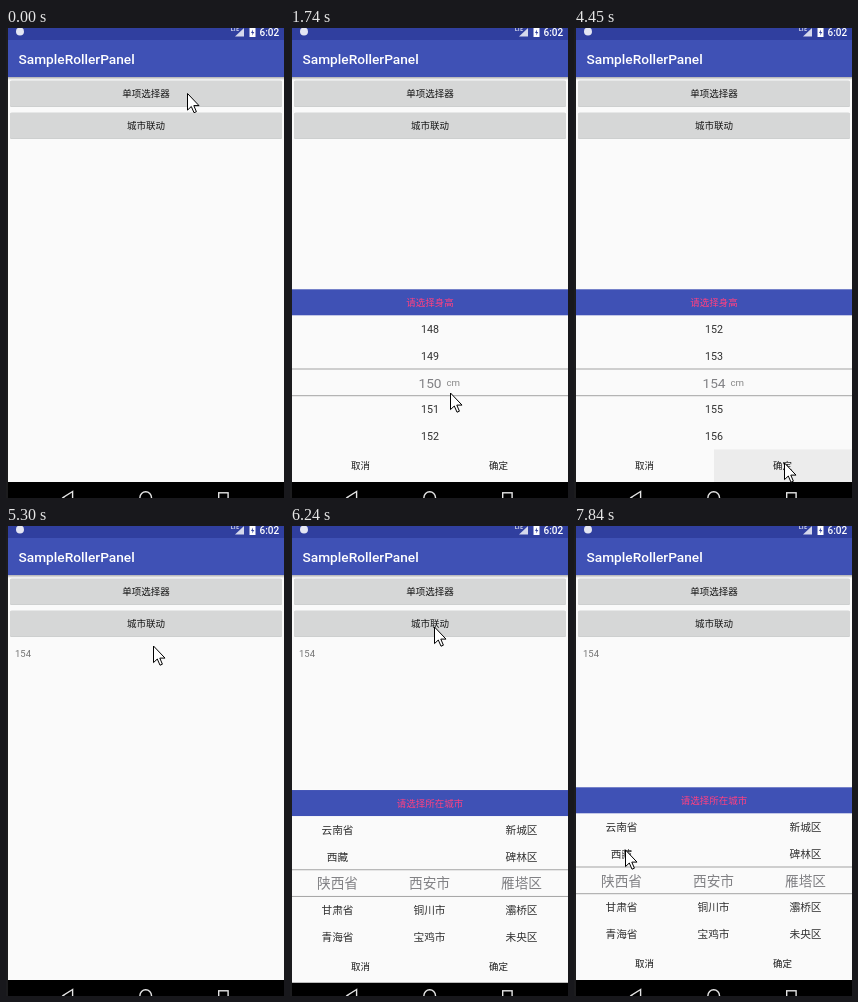
Recreate the animation shown at these times as an HTML page. Size 278 px wide and 470 px high, loop 7.99 s.

```html
<!DOCTYPE html>
<html lang="zh-CN">
<head>
<meta charset="utf-8">
<title>Picker demo</title>
<style>
html, body { margin: 0; width: 100%; height: 100%; overflow: hidden; background: #fafafa; }
svg { display: block; width: 278px; height: 470px; }
text { font-family: Roboto, "Noto Sans CJK SC", sans-serif; }
</style>
</head>
<body>
<svg viewBox="0 0 278 470">
  <defs>
    <linearGradient id="shade" x2="0" y2="1">
      <stop stop-color="#000" stop-opacity=".3"/>
      <stop offset="1" stop-color="#000" stop-opacity="0"/>
    </linearGradient>
    <clipPath id="wheelClip"><rect x="2" y="287" width="276" height="134"/></clipPath>
  </defs>

  <rect width="278" height="470" fill="#fafafa"/>
  <rect y="49" width="278" height="3" fill="url(#shade)"/>
  <rect width="278" height="49" fill="#3f51b5"/>
  <rect width="278" height="12" fill="#303f9f"/>
  <circle cx="14" cy="3.5" r="4" fill="#e4e6f3"/>
  <text x="225" y="3" font-size="5" font-weight="500" fill="#fff">LTE</text>
  <path d="M229 8.5H238V0Z" fill="#d5d8ec"/>
  <path d="M243.5 0H249.5V9H243.5Z" fill="#fff"/>
  <path d="M247 1.5L245 5H246.5L246 7.5L248.3 4H246.8Z" fill="#303f9f"/>
  <text x="253.5" y="8" font-size="10" font-weight="500" fill="#fff">6:02</text>
  <text x="12.5" y="36" font-size="13.7" font-weight="500" fill="#fff">SampleRollerPanel</text>

  <g id="page"></g>

  <rect y="454" width="278" height="16" fill="#000"/>
  <g fill="none" stroke="#e4e4e4" stroke-width="1.4">
    <path d="M66.6 463.5L57 469.5L66.6 476Z"/>
    <circle cx="139.7" cy="469.5" r="5.8"/>
    <rect x="212.7" y="464.8" width="9.4" height="10"/>
  </g>

  <g id="heightBox"></g>
  <g id="cityBox"></g>
  <rect width="2" height="470" fill="#1c1c1e"/>
  <path id="cursor" d="M.5 0V16.6L4.3 13L7 19.2L9.4 18.2L6.8 12.1H12Z" fill="#fff" stroke="#000" stroke-linejoin="round"/>
</svg>
<script>
const LOOP = 7990, ROW = 26.7, MID = 354.6;
const $ = id => document.getElementById(id);

function add(parent, tag, attrs) {
  const el = document.createElementNS("http://www.w3.org/2000/svg", tag);
  for (const k in attrs) el.setAttribute(k, attrs[k]);
  return parent.appendChild(el);
}

const rect = (parent, x, y, width, height, fill, rx = 0) =>
  add(parent, "rect", { x, y, width, height, fill, rx });

// Text centred on (x, y)
function label(parent, str, x, y, size, fill) {
  const el = add(parent, "text", { x, y: y + size * .37, "font-size": size, fill, "text-anchor": "middle" });
  el.textContent = str;
  return el;
}

function button(str, y) {
  rect($("page"), 4, y + .5, 272, 26, "#c6c7c7", 1.5);
  const face = rect($("page"), 4, y, 272, 26, "#d6d7d7", 1.5);
  label($("page"), str, 140, y + 12.9, 9.5, "#161616");
  return face;
}

// near: 1 in the middle row, 0 elsewhere
function styleRow(el, y, near) {
  const size = 10.7 + 3 * near, g = 48 + 80 * near;
  el.setAttribute("font-size", size);
  el.setAttribute("y", y + size * .37);
  el.setAttribute("fill", `rgb(${g},${g},${g + 4 * near})`);
}

function dialog(box, title) {
  rect(box, 2, 261, 276, 193, "#fafafa");
  rect(box, 2, 261.3, 276, 26, "#3f51b5");
  label(box, title, 140, 274.3, 9.5, "#ff4081");
  const press = rect(box, 140, 421.5, 138, 32.5, "#ececec");
  for (const y of [340.5, 367.2]) rect(box, 2, y, 276, 1, "#a4a4a4");
  label(box, "取消", 70.5, 437.3, 9.5, "#1c1c1c");
  label(box, "确定", 208.5, 437.3, 9.5, "#1c1c1c");
  show(press, false);
  return press;
}

const show = (el, on) => el.style.display = on ? "" : "none";
const move = (el, x, y) => el.setAttribute("transform", `translate(${x} ${y})`);
const within = (t, a, b) => t >= a && t < b;
const part = (t, a, b) => Math.min(1, Math.max(0, (t - a) / (b - a)));
const smooth = p => p * p * (3 - 2 * p);

const first = button("单项选择器", 52.5), second = button("城市联动", 84.5);
const result = label($("page"), "154", 17, 127.6, 9.5, "#757575");

const confirm = dialog($("heightBox"), "请选择身高");
const wheel = add($("heightBox"), "g", { "clip-path": "url(#wheelClip)" });
const rows = [];
for (let n = 147; n <= 157; n++) rows.push(label(wheel, n, 140, 0, 10.7, "#333"));
label($("heightBox"), "cm", 163.2, 354.2, 9.7, "#888");

dialog($("cityBox"), "请选择所在城市");
["云南省 西藏 陕西省 甘肃省 青海省", "西安市 铜川市 宝鸡市", "新城区 碑林区 雁塔区 灞桥区 未央区"]
  .forEach((column, c) => {
    const names = column.split(" ");
    names.forEach((name, i) => {
      const d = i + 3 - names.length; // the last name sits two rows below the middle
      styleRow(label($("cityBox"), name, 47.5 + 92 * c, 0, 10.7, "#333"), MID + (d - 0) * ROW, d ? 0 : 1);
    });
  });

// Cursor moves: start, end, then where it arrives
const MOVES = [
  [950, 1740, 160, 365], [1740, 2100, 163, 390], [2184, 2617, 173, 304],
  [2617, 2890, 175, 356], [2905, 3050, 177, 418], [3200, 3870, 210, 435],
  [4950, 5300, 147, 120], [5400, 5600, 144, 101],
  [6244, 7400, 53, 373], [7440, 7840, 51, 324]
];

function cursorAt(t) {
  let x = 181, y = 65.5;
  for (const [a, b, toX, toY] of MOVES) {
    const p = smooth(part(t, a, b));
    x += (toX - x) * p;
    y += (toY - y) * p;
  }
  return [x, y];
}

const rise = (t, start) => 193 * (1 - part(t, start, start + 300)) ** 3.5;
const fall = (t, start) => 193 * part(t, start, start + 220) ** 2;

function draw(t) {
  first.setAttribute("fill", within(t, 680, 950) ? "#c3c4c4" : "#d6d7d7");
  second.setAttribute("fill", within(t, 5830, 5970) ? "#c3c4c4" : "#d6d7d7");
  show(result, t >= 4590);

  show($("heightBox"), within(t, 950, 4740));
  move($("heightBox"), 0, rise(t, 870) + fall(t, 4520));
  show(confirm, t >= 4450);
  const scroll = 4 * (1 - (1 - part(t, 2184, 3000)) ** 3);
  rows.forEach((el, i) => {
    const d = i - 3 - scroll;
    styleRow(el, MID + d * ROW, Math.max(0, 1 - Math.abs(d)));
  });

  show($("cityBox"), t >= 6110);
  move($("cityBox"), 0, rise(t, 6030));
  move($("cursor"), ...cursorAt(t));
}

const start = performance.now();
function tick() {
  draw((performance.now() - start) % LOOP);
  requestAnimationFrame(tick);
}
tick();
</script>
</body>
</html>
```
